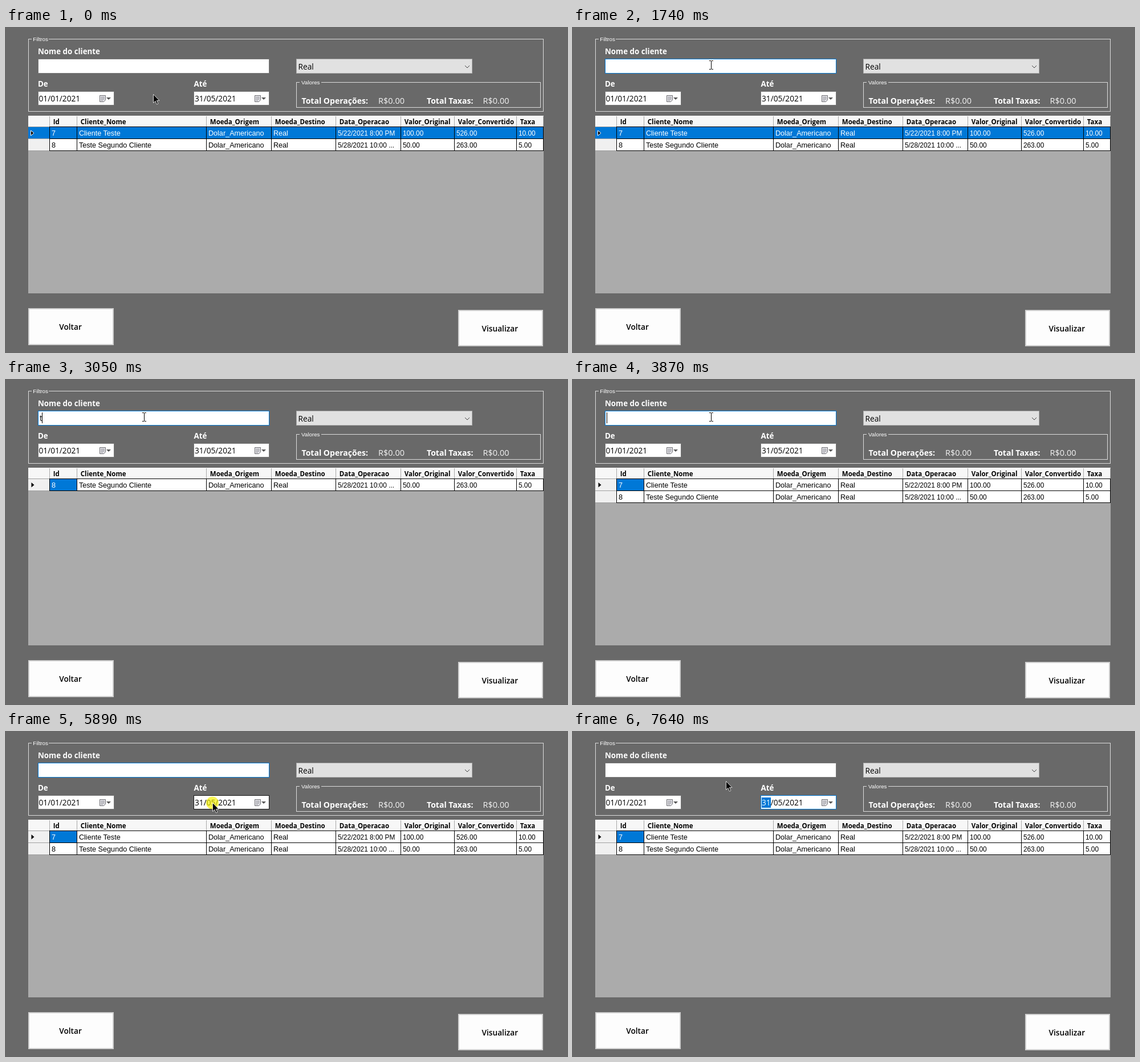
An HTML page for the animation above (8000 ms loop, 984 by 569 pixels).

```html
<!DOCTYPE html>
<html lang="pt">
<head>
<meta charset="utf-8">
<style>
  html, body { margin: 0; width: 100%; height: 100%; overflow: hidden; background: #696969; }
  svg { display: block; width: 984px; height: 569px; }
  text { white-space: pre; font-family: "Open Sans", "Noto Sans", sans-serif; }
  rect, line, .crisp { shape-rendering: crispEdges; }
  .label { font-weight: 700; font-size: 13.33px; fill: #fff; }
  .total { font-weight: 700; font-size: 14.05px; fill: #fff; }
  .money { font-size: 14.5px; fill: #f4f4f4; }
  .legend { font: 9.8px "Liberation Sans", sans-serif; fill: #fff; }
  .value { font-size: 13.7px; fill: #000; }
  .button { font-weight: 600; font-size: 13.7px; fill: #000; text-anchor: middle; }
  .head { font-weight: 700; font-size: 11.5px; fill: #000; }
  .cell { font: 12.65px "Liberation Sans", sans-serif; }
  .num { font-size: 11.9px; }
  .group { fill: none; stroke: #dcdcdc; }
</style>
</head>
<body>
<svg viewBox="0 0 984 569">
  <defs>
    <g id="calendar">
      <path d="M.5 .5h10v8l-3 3h-7z" fill="#e4e4e8" stroke="#6d6d72"/>
      <path d="M2 3.5h7M2 5.5h7M2 7.5h7M2 9.5h4M3.5 2v8M5.5 2v8M7.5 2v6" stroke="#a2a2aa" stroke-width=".7"/>
      <path d="M12 4h8l-4 4z" fill="#555"/>
    </g>
  </defs>

  <path class="group crisp" d="M45 19.5H39.5V146.5H942.5V19.5H75"/>
  <text class="legend" x="47.3" y="23.3">Filtros</text>
  <text class="label" x="56" y="46">Nome do cliente</text>
  <text class="label" x="56" y="103">De</text>
  <text class="label" x="329.5" y="103">Até</text>

  <rect id="nameBox" x="56.5" y="54.5" width="405" height="25" fill="#fff"/>
  <text id="nameText" class="value" x="59" y="72"></text>
  <rect id="caret" y="57" width="1" height="19"/>

  <rect x="56.5" y="111.5" width="133" height="24" fill="#fff" stroke="#7a7a7a"/>
  <text class="value" x="57.5" y="129">01/01/2021</text>
  <use href="#calendar" x="164" y="118"/>

  <rect id="dateBox" x="329.5" y="111.5" width="132" height="24" fill="#fff"/>
  <rect id="segment" y="115" width="16" height="18" fill="#0078d7"/>
  <text class="value" x="331" y="129"><tspan id="day">31</tspan>/<tspan id="month">05</tspan>/2021</text>
  <use href="#calendar" x="436" y="118"/>

  <rect x="509.5" y="54.5" width="308" height="25" fill="#e1e1e1" stroke="#adadad"/>
  <text class="value" x="512.5" y="73">Real</text>
  <path d="M805 66l4 4 4-4" fill="none" stroke="#444"/>

  <path class="group crisp" d="M515 95.5H509.5V139.5H937.5V95.5H553"/>
  <text class="legend" x="518" y="99.3">Valores</text>
  <text class="total" x="518.5" y="132.5">Total Operações:</text>
  <text class="money" x="653" y="132.5">R$0.00</text>
  <text class="total" x="738" y="132.5">Total Taxas:</text>
  <text class="money" x="836.5" y="132.5">R$0.00</text>

  <rect x="39" y="154" width="904" height="312" fill="#ababab"/>
  <g id="header"></g>
  <g id="rows"></g>

  <rect x="40" y="493" width="148" height="63" fill="#fdfdfd" stroke="#cfcfcf" stroke-width="2"/>
  <text class="button" x="113" y="530">Voltar</text>
  <rect x="794" y="496" width="147" height="62" fill="#fdfdfd" stroke="#cfcfcf" stroke-width="2"/>
  <text class="button" x="866.3" y="533">Visualizar</text>

  <circle id="click" r="11" fill="#f5f000"/>
  <path id="arrow" d="M.5 .5V15.5L4 12.3 6.4 18 8.8 17 6.4 11.4H11z" fill="#000" stroke="#e8e8e8" stroke-width=".9"/>
  <path id="beam" class="crisp" d="M-3 -7.5H0M1 -7.5H4M.5 -7V7M-3 7.5H0M1 7.5H4" fill="none" stroke="#000"/>
</svg>

<script>
const LOOP = 8000;
const BLUE = '#0078d7', GREY = '#7a7a7a', DARK = '#171717';
const $ = id => document.getElementById(id);
const edges = [76, 124, 351, 465, 578, 692, 786, 895, 942];
const titles = ['Id', 'Cliente_Nome', 'Moeda_Origem', 'Moeda_Destino', 'Data_Operacao',
  'Valor_Original', 'Valor_Convertido', 'Taxa'];
const records = [
  ['7', 'Cliente Teste', 'Dolar_Americano', 'Real', '5/22/2021 8:00 PM', '100.00', '526.00', '10.00'],
  ['8', 'Teste Segundo Cliente', 'Dolar_Americano', 'Real', '5/28/2021 10:00 ...', '50.00', '263.00', '5.00']
];
const ROW_TOP = 174, ROW_STEP = 21;

const box = (x, y, w, h, fill) => `<rect x="${x}" y="${y}" width="${w}" height="${h}" fill="${fill}"/>`;

function drawHeader() {
  let out = box(39, 154, 904, 19, '#f7f7f7') + box(39, 173, 38, 1, '#a0a0a0');
  titles.forEach((title, i) => {
    out += box(edges[i], 155, 1, 18, '#a8a8a8') +
      `<text class="head" x="${edges[i] + 6.8}" y="169">${title}</text>`;
  });
  return out + box(942, 155, 1, 18, '#a8a8a8') + box(76, 173, 867, 1, '#000');
}

// mark: 'row' selects the whole line, 'cell' only the first cell
function drawRow(record, index, mark) {
  const y = ROW_TOP + index * ROW_STEP;
  const whole = mark === 'row';
  let out = box(39, y, 38, 20, whole ? BLUE : '#f0f0f0') + box(39, y + 20, 38, 1, '#a0a0a0');
  record.forEach((value, i) => {
    const x = edges[i], chosen = whole || (mark === 'cell' && i === 0);
    out += box(x, y, edges[i + 1] - x, 20, chosen ? BLUE : '#fff') +
      `<text class="cell ${i > 3 ? 'num' : ''}" x="${x + 3.9}" y="${y + 15}" fill="${chosen ? '#fff' : '#000'}">${value}</text>`;
  });
  edges.forEach(x => out += box(x, y, 1, 20, '#000'));
  out += box(76, y + 20, 867, 1, '#000');
  if (whole) out += `<path d="M43.5 ${y + 6}v9l5.5-4.5z" fill="#000" stroke="#fff"/>`;
  if (mark === 'cell') out += `<path d="M44.5 ${y + 6}v8.5l5-4.25z" fill="#000"/>`;
  return out;
}

let shownGrid = '';
function showGrid(filter, mark) {
  const key = filter + mark;
  if (key === shownGrid) return;
  shownGrid = key;
  $('rows').innerHTML = records.filter(r => !filter || r[0] === filter)
    .map((r, i) => drawRow(r, i, i ? '' : mark)).join('');
}

// time, x, y of the pointer
const path = [
  [0, 258, 116], [330, 257, 114], [480, 253, 100], [680, 244, 74], [830, 242, 65],
  [4880, 242, 65], [5030, 272, 130], [5180, 322, 272], [5280, 338, 307],
  [5380, 350, 240], [5480, 359, 158], [5580, 362, 124],
  [6800, 362, 124], [6950, 339, 120],
  [7500, 339, 120], [7640, 268, 86]
];
const clicks = [[1030, 1240], [5890, 6150], [7000, 7200]];

// the pointer moves in 50 ms steps
function pointer(time) {
  const t = Math.floor((time - 30) / 50) * 50 + 30;
  if (time >= 7640) return [268, 86];
  const i = path.findIndex(p => p[0] > t);
  if (i < 1) return path[0].slice(1);
  const a = path[i - 1], b = path[i], k = (t - a[0]) / (b[0] - a[0]);
  return [1, 2].map(n => Math.round(a[n] + (b[n] - a[n]) * k));
}

const within = (t, from, to) => t >= from && t < to;
const inside = (x, y, left, top, right, bottom) => x >= left && x < right && y >= top && y < bottom;

function draw(t) {
  const [x, y] = pointer(t);
  const overName = inside(x, y, 56, 54, 462, 80);
  const overDate = inside(x, y, 329, 111, 462, 136);
  const nameFocus = within(t, 1080, 5970), dateFocus = t >= 5970;

  $('nameBox').setAttribute('stroke', nameFocus ? BLUE : overName ? DARK : GREY);
  $('dateBox').setAttribute('stroke', dateFocus ? BLUE : overDate ? DARK : GREY);

  const typed = within(t, 2040, 2650) ? 'c' : within(t, 3050, 3820) ? 't' : '';
  $('nameText').textContent = typed;
  $('caret').setAttribute('x', { c: 66, t: 63 }[typed] || 59);
  const blink = [[1240, 1740], [2040, 2600], [2650, 3570], [3820, 4370], [4880, 5380]];
  $('caret').style.display = blink.some(b => within(t, ...b)) ? '' : 'none';

  const filter = within(t, 2100, 2700) ? '7' : within(t, 3050, 3870) ? '8' : '';
  showGrid(filter, t < 2100 ? 'row' : 'cell');

  const onDay = t >= 7050;
  $('segment').style.display = dateFocus ? '' : 'none';
  $('segment').setAttribute('x', onDay ? 331 : 352);
  $('day').style.fill = dateFocus && onDay ? '#fff' : '';
  $('month').style.fill = dateFocus && !onDay ? '#fff' : '';

  const click = clicks.find(c => within(t, ...c));
  $('click').style.display = click ? '' : 'none';
  if (click) {
    const age = (t - click[0]) / (click[1] - click[0]);
    $('click').setAttribute('cx', x);
    $('click').setAttribute('cy', y + .5);
    $('click').setAttribute('opacity', .68 * Math.min(1, 1.4 * (1 - age)));
  }

  $('beam').style.display = overName ? '' : 'none';
  $('arrow').style.display = overName ? 'none' : '';
  $('beam').setAttribute('transform', `translate(${x} ${y})`);
  $('arrow').setAttribute('transform', `translate(${x} ${y})`);
}

$('header').innerHTML = drawHeader();
const start = performance.now();
function tick() {
  draw((performance.now() - start) % LOOP);
  requestAnimationFrame(tick);
}
tick();
</script>
</body>
</html>
```
